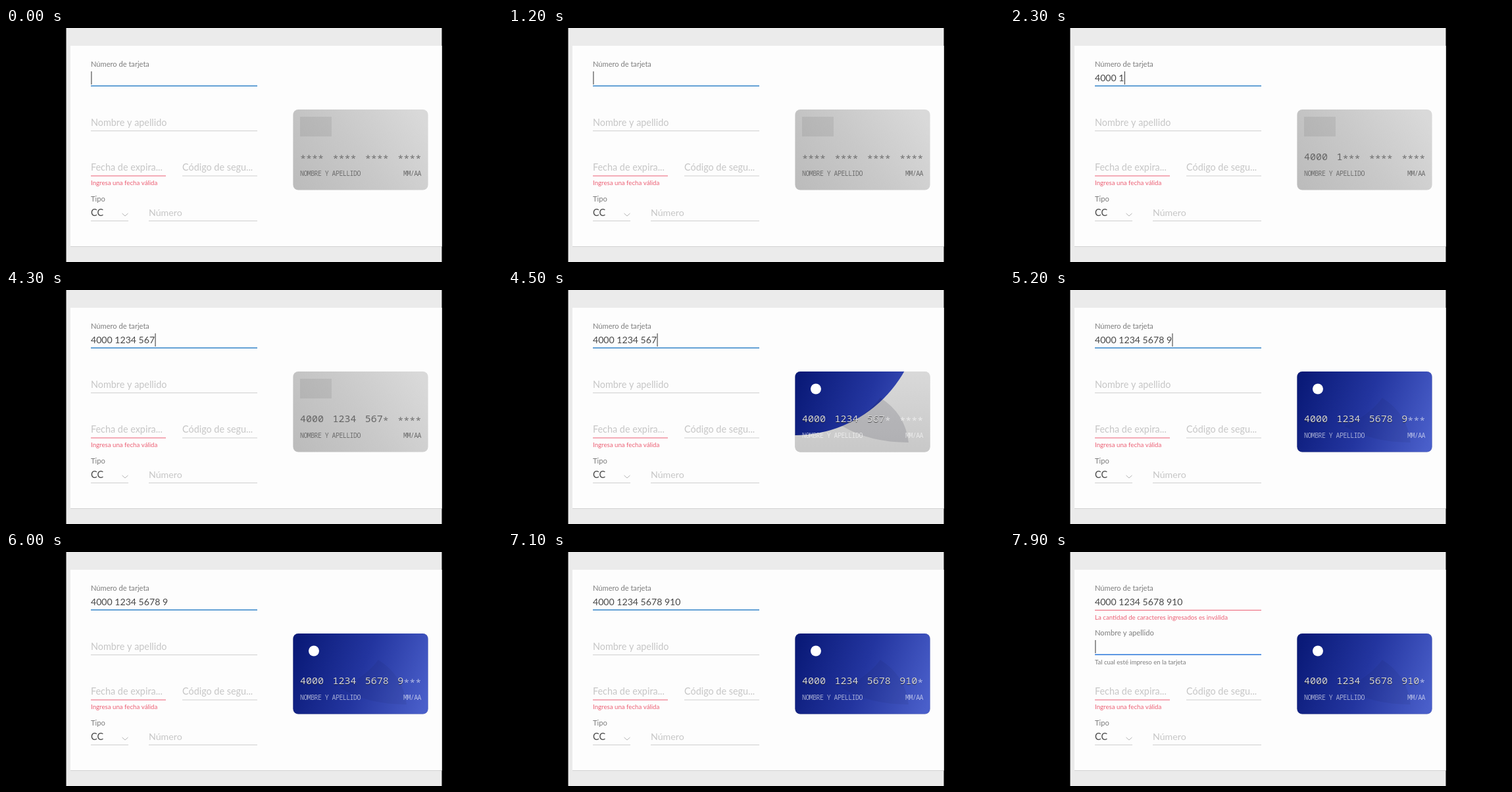
These frames come from a looping animation (754x356 px, 8 s). An HTML page with a canvas:

```html
<!DOCTYPE html>
<html lang="es">
<head>
<meta charset="utf-8">
<style>
  html, body { margin: 0; width: 100%; height: 100%; overflow: hidden; background: #000; }
  canvas { display: block; }
</style>
</head>
<body>
<canvas width="754" height="356"></canvas>
<script>
const ctx = document.querySelector('canvas').getContext('2d');
const LOOP = 8000, REVEAL = 4350, BLUR = 7400;
const DIGITS = '400012345678910';
const KEY_TIMES = [1400, 1600, 1700, 1800, 2300, 2500, 2700, 3100, 3400, 3800, 4200, 4700, 5100, 6100, 6600];
const CARET_RESETS = [0, 1200, ...KEY_TIMES];
const RED = '#ec5f74', RULE = '#cfcfcf', HINT = '#c6c6c6', LABEL = '#7d7d7d', INK = '#484848';
const FAINT_WHITE = 'rgba(255,255,255,.6)';

const clamp = v => Math.min(1, Math.max(0, v));
const progress = (t, start, length) => clamp((t - start) / length);
const easeOut = p => 1 - (1 - p) ** 2;
const lerp = (a, b, p) => a + (b - a) * p;
const gray = v => `rgb(${v},${v},${v})`;

function text(str, x, y, size, color, family = 'Lato, sans-serif') {
  ctx.font = `${size}px ${family}`;
  ctx.fillStyle = color;
  ctx.fillText(str, x, y);
}

function rect(x, y, w, h, color) {
  ctx.fillStyle = color;
  ctx.fillRect(x, y, w, h);
}

function circle(x, y, r, fill) {
  ctx.beginPath();
  ctx.arc(x, y, r, 0, 7);
  ctx.fillStyle = fill;
  ctx.fill();
}

function gradient(x0, y0, x1, y1, ...colors) {
  const g = ctx.createLinearGradient(x0, y0, x1, y1);
  colors.forEach((c, i) => g.addColorStop(i / (colors.length - 1), c));
  return g;
}

const caret = (x, y) => rect(x, y, 1, 20, '#333');
const focusLine = (y, color) => rect(129, y, 253, 1.7, color);

function drawPage() {
  rect(0, 0, 754, 356, '#000');
  rect(91.5, 0, 571, 356, '#ebebeb');
  rect(98, 27, 564.5, 306, '#d2d2d2');
  rect(98, 27, 564.5, 305, '#fdfdfd');
}

function drawForm(t, typed) {
  const blurred = t >= BLUR;
  const value = typed.replace(/(.{4})(?=.)/g, '$1 ');

  text('Número de tarjeta', 129, 58.5, 11.1, LABEL);
  text(value, 129, 81, 14.1, INK);
  if (blurred) {
    rect(129, 88, 253, 1, RED);
    ctx.globalAlpha = progress(t, BLUR, 200);
    text('La cantidad de caracteres ingresados es inválida', 129, 102.5, 9.7, RED);
    ctx.globalAlpha = 1;
  } else {
    const lastReset = CARET_RESETS.filter(k => k <= t).pop();
    if ((t - lastReset) % 1200 < 500) caret(129.4 + ctx.measureText(value).width, 66);
    focusLine(87.3, '#4a92cf');
  }

  const lift = easeOut(progress(t, BLUR, 200));
  text('Nombre y apellido', 129, lerp(149, 127, lift), lerp(14.4, 11.2, lift), gray(lerp(198, 125, lift)));
  rect(129, 156, 253, 1, RULE);
  if (blurred) {
    ctx.globalAlpha = lift;
    focusLine(155.3, '#4286de');
    text('Tal cual esté impreso en la tarjeta', 129, 171, 9.55, LABEL);
    ctx.globalAlpha = 1;
    if (t >= 7500) caret(129.4, 134);
  }

  text('Fecha de expira...', 129, 217, 14.4, HINT);
  rect(129, 224.5, 114, 1, RED);
  text('Ingresa una fecha válida', 129, 239, 9.7, RED);
  text('Código de segu...', 268, 217, 14.4, HINT);
  rect(268, 224.5, 114, 1, RULE);

  text('Tipo', 129, 264, 11.2, LABEL);
  text('CC', 129, 286, 14.4, INK);
  rect(129, 293, 57, 1, RULE);
  ctx.strokeStyle = '#b5b5b5';
  ctx.beginPath();
  ctx.moveTo(176.5, 282);
  ctx.lineTo(181, 286);
  ctx.lineTo(185.5, 282);
  ctx.stroke();
  text('Número', 217, 286, 14.2, HINT);
  rect(217, 293, 165, 1, RULE);
}

function drawCard(t, typed) {
  const mono = '"Noto Sans Mono", monospace';
  const branded = t >= REVEAL;
  ctx.save();
  ctx.beginPath();
  ctx.roundRect(436.4, 124, 205.2, 122.6, 8);
  ctx.clip();

  rect(436, 124, 206, 123, gradient(450, 250, 625, 124, '#bcbcbc', '#c9c9c9', '#d9d9d9'));
  if (branded) {
    ctx.globalAlpha = progress(t, REVEAL, 120);
    rect(436, 124, 206, 123, gradient(540, 124, 540, 247, '#d9d9d9', '#c8c8c8'));
    ctx.globalAlpha = 1;
    circle(436, 30, 342 * easeOut(progress(t, REVEAL, 450)),
      gradient(440, 145, 642, 220, '#0a1a78', '#23359f', '#4a5fca'));
    ctx.fillStyle = `rgba(0,0,30,${lerp(.13, .06, progress(t, 4500, 250))})`;
    ctx.beginPath();
    ctx.moveTo(508, 207);
    ctx.quadraticCurveTo(545, 192, 566, 164);
    ctx.quadraticCurveTo(604, 188, 609, 232);
    ctx.quadraticCurveTo(550, 232, 508, 207);
    ctx.fill();
    circle(468, 150.5, 8, '#fff');
  } else {
    rect(447, 135, 48, 30, 'rgba(0,0,0,.07)');
  }

  const digitColor = gray(Math.round(lerp(100, 215, progress(t, REVEAL, 120))));
  const softColor = branded ? FAINT_WHITE : '#6e6e6e';
  ctx.shadowOffsetY = 1;
  [...typed.padEnd(16, '*')].forEach((char, i) => {
    const x = 447 + Math.floor(i / 4) * 49.4 + i % 4 * 9;
    const masked = char === '*';
    ctx.shadowColor = branded && !masked ? 'rgba(0,0,0,.6)' : 'transparent';
    text(char, x, masked ? 204 : 201.3, 15, masked ? softColor : digitColor, mono);
  });
  ctx.shadowColor = 'transparent';
  ctx.letterSpacing = '-0.6px';
  text('NOMBRE Y APELLIDO', 447, 225, 10, softColor, mono);
  text('MM/AA', 604, 225, 10, softColor, mono);
  ctx.restore();
}

function draw(now) {
  const t = now % LOOP;
  const typed = DIGITS.slice(0, KEY_TIMES.filter(k => k <= t).length);
  drawPage();
  drawForm(t, typed);
  drawCard(t, typed);
  requestAnimationFrame(draw);
}
requestAnimationFrame(draw);
</script>
</body>
</html>
```
